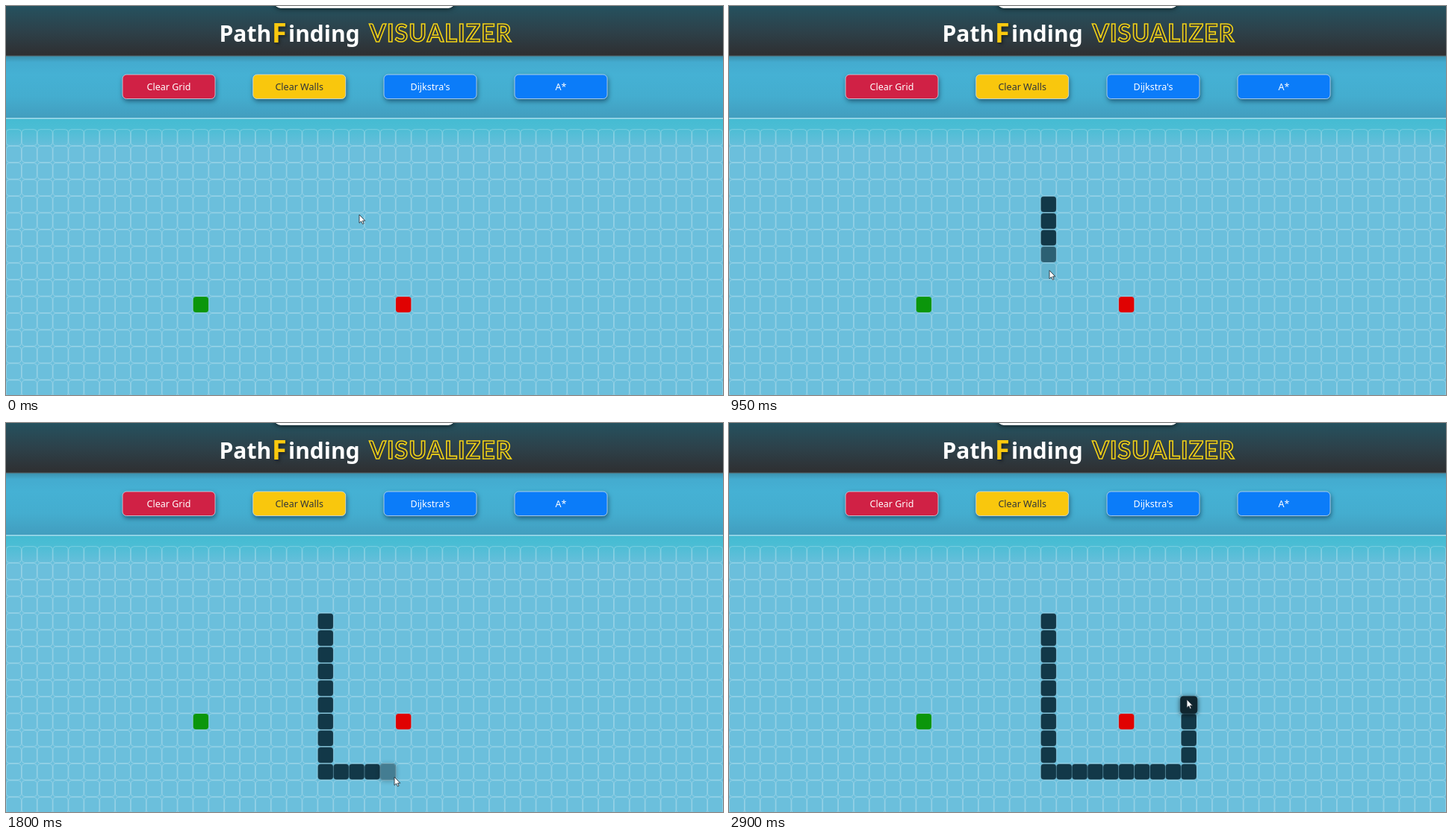
Animation, 960 px wide and 522 px high, one loop 3000 ms. Source, as an HTML page:

```html
<!DOCTYPE html>
<html lang="en">
<head>
<meta charset="utf-8">
<title>Path Finding Visualizer</title>
<style>
  html, body { margin: 0; width: 100%; height: 100%; overflow: hidden; background: #6bbfdc; }
  svg { display: block; width: 960px; height: 522px; font-family: "Noto Sans", "Open Sans", sans-serif; }
  .title { font-size: 30px; font-weight: 600; fill: #fff; }
  .accent { font-size: 36px; font-weight: 800; fill: #fac90f; filter: drop-shadow(2px 2px 2px #111a); }
  .deco { font: 700 32px Lato, sans-serif; letter-spacing: 1.2px; fill: #34383a; stroke: #f3d416; stroke-width: 1.6; }
  .button rect { stroke: #d9e6f2; stroke-opacity: .75; filter: drop-shadow(1px 3px 3px #0b2c4499); }
  .button text { font-size: 12.5px; text-anchor: middle; }
  .cell { fill: none; stroke: #fff; stroke-opacity: .25; }
  .hover { filter: drop-shadow(0 1px 3px #0009); }
</style>
</head>
<body>
<svg id="stage" viewBox="0 0 960 522">
  <defs>
    <linearGradient id="header" x2="0" y2="1">
      <stop stop-color="#25525f"/><stop offset=".5" stop-color="#2d414a"/><stop offset="1" stop-color="#2f2f31"/>
    </linearGradient>
    <linearGradient id="nav" x2="0" y2="1">
      <stop stop-color="#3a8fac"/><stop offset=".1" stop-color="#44abcf"/><stop offset=".3" stop-color="#45b1d4"/>
      <stop offset=".65" stop-color="#44adcf"/><stop offset="1" stop-color="#429dbe"/>
    </linearGradient>
    <linearGradient id="board" x2="0" y2="1">
      <stop stop-color="#44bbd2"/><stop offset=".3" stop-color="#4abdd4"/><stop offset="1" stop-color="#6bbfdc"/>
    </linearGradient>
  </defs>
  <rect width="960" height="522" fill="#6bbfdc"/>
  <rect y="150" width="960" height="42" fill="url(#board)"/>
  <rect y="67" width="960" height="84" fill="url(#nav)"/>
  <rect y="150" width="960" height="1.5" fill="#a5dcec"/>
  <rect width="960" height="67" fill="url(#header)"/>
  <rect y="66.5" width="960" height="1" fill="#56686f"/>
  <rect x="359" y="-20" width="242" height="23" rx="9" fill="#fff" style="filter:drop-shadow(0 1px 3px #000a)"/>
  <text class="title" x="285.5" y="48">Path</text>
  <text class="accent" x="356" y="49">F</text>
  <text class="title" x="378" y="48">inding</text>
  <text class="deco" x="486.5" y="48">VISUALIZER</text>
  <g id="buttons"></g>
  <g id="grid"></g>
  <g id="walls"></g>
  <path id="cursor" d="M0 0V11.2L2.6 8.8 4.4 12.6 6.1 11.8 4.4 8.2H7.8Z" fill="#fff" stroke="#26323a" stroke-width=".9"/>
</svg>
<script>
const LOOP = 3000, STEP = 50, LAST = 2900;
const COLS = 46, ROWS = 16, TOP = 165.2, W = 960 / COLS, H = 22.43;
const PRESS = 470, LAG = 30, FADE = 130;

// Mouse path: time, x, y
const path = [
  [0, 473, 280], [350, 431, 265], [500, 429, 267], [750, 429, 301], [1200, 429, 422],
  [1400, 430, 468], [1800, 520, 475], [2100, 591, 471], [2250, 601, 467],
  [2350, 613, 464], [2750, 614, 383], [2900, 613, 371]
];

const byId = id => document.getElementById(id);
const clamp = v => Math.max(0, Math.min(1, v));

function add(parent, tag, attrs, text = "") {
  const el = document.createElementNS("http://www.w3.org/2000/svg", tag);
  for (const name in attrs) el.setAttribute(name, attrs[name]);
  el.textContent = text;
  return parent.appendChild(el);
}

function mouseAt(t) {
  const i = Math.max(1, path.findIndex(p => p[0] >= t));
  const [a, b] = [path[i - 1], path[i]];
  const k = (t - a[0]) / (b[0] - a[0]);
  return [a[1] + (b[1] - a[1]) * k, a[2] + (b[2] - a[2]) * k];
}

function block(parent, col, row, fill) {
  return add(parent, "rect", {
    x: col * W + .1, y: TOP + row * H + .6, width: W - .2, height: 21.2, rx: 4,
    fill, stroke: "#8fc6da", "stroke-opacity": .3, "stroke-width": .6
  });
}

function button(x, label, fill, color) {
  const g = add(byId("buttons"), "g", { class: "button" });
  add(g, "rect", { x, y: 92, width: 124, height: 32.5, rx: 5.5, fill });
  add(g, "text", { x: x + 62, y: 113, fill: color }, label);
}

button(156, "Clear Grid", "#d02145", "#fff");
button(330.7, "Clear Walls", "#f9c70d", "#30343a");
button(506, "Dijkstra's", "#0b7cf9", "#fff");
button(681, "A*", "#0b7cf9", "#fff");

for (let row = 0; row < ROWS; row++)
  for (let col = 0; col < COLS; col++)
    add(byId("grid"), "rect", {
      class: "cell", x: col * W + .4, y: TOP + row * H + .5, width: W - .8, height: H - .8, rx: 4
    });
block(byId("grid"), 12, 10, "#0b960b");
block(byId("grid"), 25, 10, "#e00202");

// Every cell the pressed mouse enters becomes a wall
const walls = [];
for (let t = PRESS; t <= LAST; t++) {
  const [x, y] = mouseAt(t);
  const col = Math.floor(x / W), row = Math.floor((y - TOP) / H);
  const current = walls[walls.length - 1];
  if (current && current.col === col && current.row === row) continue;
  if (current) current.leave = t;
  walls.push({ col, row, enter: t, leave: Infinity, el: block(byId("walls"), col, row, "#123848") });
}

function render(t) {
  const [x, y] = mouseAt(t);
  byId("cursor").setAttribute("transform", `translate(${x} ${y})`);
  for (const { col, row, enter, leave, el } of walls) {
    const shown = clamp((t - LAG - enter) / FADE);
    const hovered = shown > 0 && t - LAG < leave;
    const scale = hovered ? 1 + .13 * shown : 1;
    const cx = (col + .5) * W, cy = TOP + row * H + 11.2;
    el.setAttribute("opacity", shown);
    el.setAttribute("fill", hovered ? "#10262f" : "#123848");
    el.setAttribute("class", hovered ? "hover" : "");
    el.setAttribute("transform", `translate(${cx} ${cy}) scale(${scale}) translate(${-cx} ${-cy})`);
  }
}

const start = performance.now();
function frame() {
  const t = (performance.now() - start) % LOOP;
  render(Math.min(LAST, Math.floor(t / STEP) * STEP));
  requestAnimationFrame(frame);
}
frame();
</script>
</body>
</html>
```
